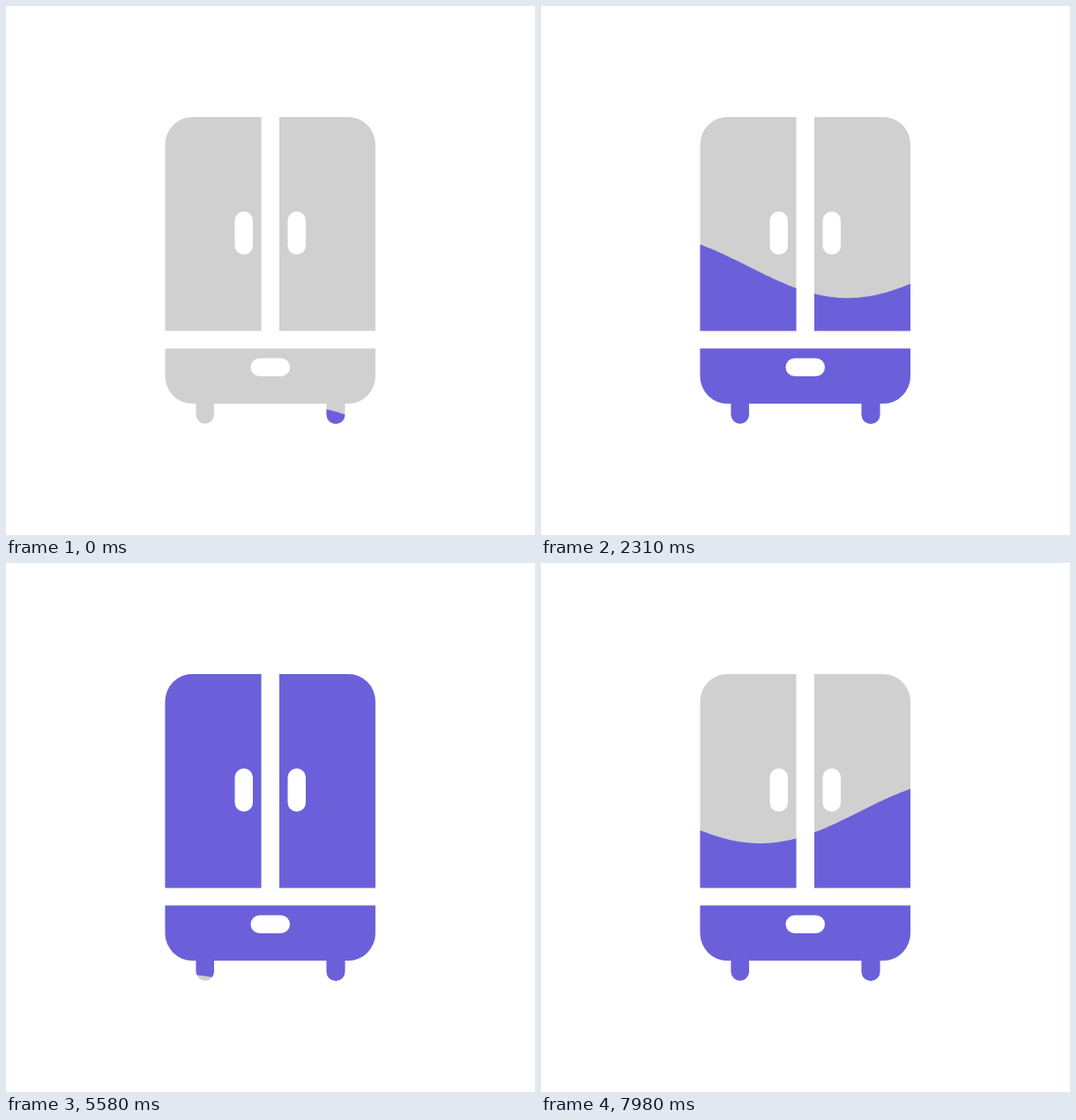
Animation of 600 by 600 pixels, one loop 8000 ms. Source, as an HTML page:

```html
<!DOCTYPE html>
<html lang="en">
<head>
<meta charset="utf-8">
<title>Wardrobe filling loader</title>
<style>
  html, body { margin: 0; width: 100%; height: 100%; overflow: hidden; background: #fff; }
  svg { display: block; width: 100vw; height: 100vh; }
</style>
</head>
<body>
<svg viewBox="0 0 600 600">
  <defs>
    <path id="cabinet" d="M289.5 126V368.5H180.5V157A31 31 0 0 1 211.5 126Z
      M310 126V368.5H419V157A31 31 0 0 0 388 126Z
      M180.5 388.5H419V420A31 31 0 0 1 388 451H384.5V463.5A10.5 10.5 0 0 1 363.5 463.5V451
      H236V463.5A10.25 10.25 0 0 1 215.5 463.5V451H211.5A31 31 0 0 1 180.5 420Z"/>
    <clipPath id="inside"><use href="#cabinet"/></clipPath>
  </defs>
  <use href="#cabinet" fill="#d0d0d0"/>
  <g clip-path="url(#inside)"><path id="liquid" fill="#6b60da"/></g>
  <g fill="#fff">
    <rect x="259.5" y="233" width="20.5" height="49" rx="10.25"/>
    <rect x="319.5" y="233" width="20.5" height="49" rx="10.25"/>
    <rect x="277.5" y="399.5" width="44.5" height="20.5" rx="10.25"/>
  </g>
</svg>
<script>
const LOOP = 8000, STEP = 30;
const AMPLITUDE = 36, WAVELENGTH = 452, WAVE_MS = 1500, DEPTH = 430;
const CREST_X = 329.8; // crest position at time zero

// Timing curve with the same parameters as CSS cubic-bezier()
function bezier(x1, y1, x2, y2) {
  const at = (a, b, s) => 3 * a * s * (1 - s) ** 2 + 3 * b * s * s * (1 - s) + s ** 3;
  return x => {
    let low = 0, high = 1;
    for (let i = 0; i < 30; i++) {
      const mid = (low + high) / 2;
      if (at(x1, x2, mid) < x) low = mid; else high = mid;
    }
    return at(y1, y2, low);
  };
}

// Mean height of the surface: fill to half, fill up, drain to half
const phases = [
  { start: 0, end: 2745, from: 489.5, to: 279, ease: bezier(.6, 0, .4, .8) },
  { start: 2745, end: 5700, from: 279, to: 72.5, ease: bezier(.45, .15, .4, 1) },
  { start: 5700, end: LOOP, from: 72.5, to: 282, ease: bezier(.3, 0, .5, 1) }
];

function levelAt(t) {
  const { start, end, from, to, ease } = phases.find(phase => t < phase.end);
  return from + (to - from) * ease((t - start) / (end - start));
}

const liquid = document.getElementById('liquid');

function draw(t) {
  const level = levelAt(t);
  const crest = CREST_X + WAVELENGTH * t / WAVE_MS;
  const surface = [], floor = [];
  for (let x = 176; x <= 424; x += 2) {
    const y = level - AMPLITUDE * Math.cos(2 * Math.PI * (x - crest) / WAVELENGTH);
    surface.push(`${x} ${y.toFixed(2)}`);
    floor.unshift(`${x} ${(y + DEPTH).toFixed(2)}`);
  }
  liquid.setAttribute('d', `M${surface.concat(floor).join('L')}Z`);
}

function frame() {
  const t = performance.now() % LOOP;
  draw(Math.floor(t / STEP) * STEP);
  requestAnimationFrame(frame);
}
frame();
</script>
</body>
</html>
```
